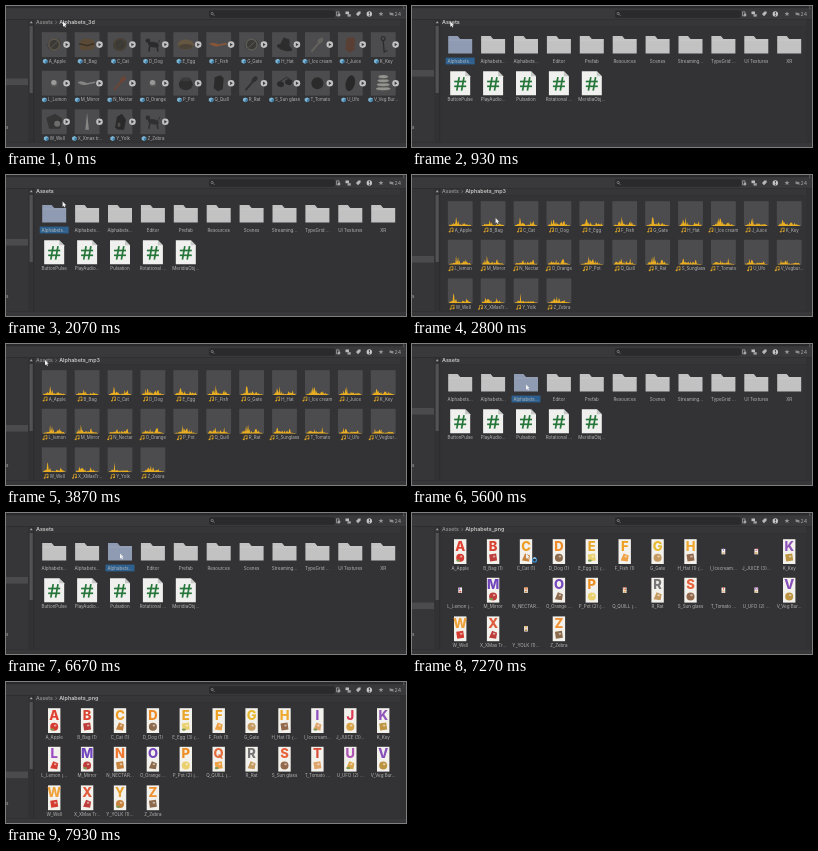
These frames come from a looping animation (400 px wide and 141 px high, 8000 ms). An HTML page with a canvas:

```html
<!DOCTYPE html>
<html lang="en">
<head>
<meta charset="utf-8">
<title>Asset browser</title>
<style>
html, body { margin: 0; width: 100%; height: 100%; overflow: hidden; background: #333; }
canvas { display: block; width: 400px; height: 141px; }
</style>
</head>
<body>
<canvas id="stage"></canvas>
<script>
const W = 400, H = 141, LOOP = 8000;
const canvas = document.getElementById('stage');
const ctx = canvas.getContext('2d');
const ratio = window.devicePixelRatio || 1;
canvas.width = W * ratio;
canvas.height = H * ratio;

const FONT = 'Inter, Roboto, sans-serif';
const LABEL = '#b4b4b5';
const list = s => s.split('|');
const folders = list('Alphabets...|Alphabets...|Alphabets...|Editor|Prefab|Resources|Scenes|Streaming...|TypeGrid ...|UI Textures|XR');
const scripts = list('ButtonPulse|PlayAudio...|Pulsation|Rotational ...|MeridiaObj...');
const models = list('A_Apple|B_Bag|C_Cat|D_Dog|E_Egg|F_Fish|G_Gate|H_Hat|I_Ice cream|J_Juice|K_Key|L_Lemon|M_Mirror|N_Nectar|O_Orange|P_Pot|Q_Quill|R_Rat|S_Sun glass|T_Tomato|U_Ufo|V_Veg Bur...|W_Well|X_Xmas tr...|Y_Yolk|Z_Zebra');
const sounds = list('A_Apple|B_Bag|C_Cat|D_Dog|E_Egg|F_Fish|G_Gate|H_Hat|I_Ice cream|J_Juice|K_Key|L_lemon|M_Mirror|N_Nectar|O_Orange|P_Pot|Q_Quill|R_Rat|S_Sunglass|T_Tomato|U_Ufo|V_Vegbur...|W_Well|X_XMasTr...|Y_Yolk|Z_Zebra');
const images = list('A_Apple|B_Bag (1)|C_Cat (1)|D_Dog (1)|E_Egg (3) (...|F_Fish (1)|G_Gate|H_Hat (1) (...|I_Icecream...|J_JUICE (3)...|K_Key|L_Lemon (...|M_Mirror|N_NECTAR...|O_Orange ...|P_Pot (2) (...|Q_QUILL (...|R_Rat|S_Sun glass|T_Tomato ...|U_UFO (2) ...|V_Veg Bur...|W_Well|X_XMas Tr...|Y_YOLK (1)...|Z_Zebra');

// Shape and tint of each model, A to Z
const modelShapes = list('ring|box|ring|animal|egg|bar|ring|hat|stick|cup|key|ball|bar|stick|ball|pot|cup|stick|glasses|disc|pod|stack|house|spike|rock|animal');
const modelTints = list('#5c574a|#5a4a35|#4a4034|#2b2b2b|#655641|#84563a|#5a5a57|#2d2d2e|#64625f|#5a4034|#2c2c2d|#9a9a98|#858482|#6b4638|#9a9896|#2e2e2f|#2b2b2c|#303031|#2a2a2b|#2b2b2b|#29292a|#93938f|#353536|#868684|#2a2a2b|#303031');
const inks = list('#e04132|#d94332|#ee9d24|#ed8b27|#e8a528|#efa022|#e7b82e|#eda82d|#8b4fc0|#dc3c55|#8f55b8|#9a4ac2|#7146bd|#ef7831|#7545ba|#ed8e23|#e26a3b|#777|#e8623c|#d94e38|#ad54b5|#8750b9|#f0a23a|#df5b3b|#e7a337|#ef9132');
const props = list('#d43c31|#bd3d3a|#c5833e|#8c6a4c|#ead06e|#eea144|#c59a61|#93694c|#dfa46c|#d8a348|#bc9442');

function rect(x, y, w, h, color) {
  ctx.fillStyle = color;
  ctx.fillRect(x, y, w, h);
}

function oval(x, y, rx, ry, color, turn = 0) {
  ctx.fillStyle = color;
  ctx.beginPath();
  ctx.ellipse(x, y, rx, ry, turn, 0, Math.PI * 2);
  ctx.fill();
}

function shape(points, color) {
  ctx.fillStyle = color;
  ctx.beginPath();
  for (let i = 0; i < points.length; i += 2) ctx.lineTo(points[i], points[i + 1]);
  ctx.closePath();
  ctx.fill();
}

function stroke(points, color, width) {
  ctx.strokeStyle = color;
  ctx.lineWidth = width;
  ctx.beginPath();
  for (let i = 0; i < points.length; i += 2) ctx.lineTo(points[i], points[i + 1]);
  ctx.stroke();
}

function ring(x, y, r, color, width, from = 0, to = 7) {
  ctx.strokeStyle = color;
  ctx.lineWidth = width;
  ctx.beginPath();
  ctx.arc(x, y, r, from, to);
  ctx.stroke();
}

function text(s, x, y, size, color, align = 'left', weight = 400) {
  ctx.font = `${weight} ${size}px ${FONT}`;
  ctx.textAlign = align;
  ctx.textBaseline = 'middle';
  ctx.fillStyle = color;
  ctx.fillText(s, x, y);
}

function random(seed) {
  const v = Math.sin(seed * 12.9898) * 43758.5453;
  return v - Math.floor(v);
}

function grid(names, draw) {
  names.forEach((name, i) => draw(name, 48.2 + (i % 11) * 32.9, 38.6 + Math.floor(i / 11) * 38.6, i));
}

function caption(s, x, y) {
  text(s, x, y, 4.5, LABEL, 'center');
}

// Icon and label, centred together below a thumbnail
function iconCaption(s, x, y, icon) {
  const size = 4.4, gap = 6;
  ctx.font = `400 ${size}px ${FONT}`;
  const left = x - (ctx.measureText(s).width + gap) / 2;
  icon(left + 2.5, y);
  text(s, left + gap, y, size, LABEL);
}

function cubeIcon(x, y) {
  shape([x - 2.3, y - 1.2, x, y - 2.4, x + 2.3, y - 1.2, x + 2.3, y + 1.3, x, y + 2.5, x - 2.3, y + 1.3], '#7db4d2');
  shape([x, y, x + 2.3, y - 1.2, x + 2.3, y + 1.3, x, y + 2.5], '#3c7ca6');
}

function noteIcon(x, y) {
  const gold = '#e0a82a';
  stroke([x - 1, y + 1.5, x - 1, y - 1.8, x + 1.9, y - 2.3, x + 1.9, y + 0.9], gold, 0.7);
  oval(x - 1.6, y + 1.6, 1, 0.8, gold);
  oval(x + 1.3, y + 1, 1, 0.8, gold);
}

function chrome(view) {
  rect(0, 0, W, H, '#333335');
  rect(0, 0, W, 2.4, '#2a2a2c');
  rect(0, 2.4, W, 10.6, '#39393b');
  rect(0, 13, W, 0.6, '#2a2a2c');
  rect(28, 13.6, 366, 6.6, '#363638');
  rect(28, 20.2, 366, 0.5, '#2f2f31');
  ctx.fillStyle = '#2a2a2c';
  ctx.beginPath();
  ctx.roundRect(203, 4.3, 126, 7.4, 2);
  ctx.fill();
  ring(206.2, 7.5, 1.1, '#a0a0a0', 0.6);
  stroke([207, 8.4, 208.3, 9.7], '#a0a0a0', 0.7);

  // Toolbar icons
  stroke([330.5, 5.8, 333, 5.8, 333, 9.8, 330.5, 9.8, 330.5, 5.8], '#a8a8a8', 0.7);
  oval(333, 9, 1.4, 1.4, '#a8a8a8');
  shape([339.5, 5.5, 343, 5.5, 343, 8.2, 339.5, 8.2], '#bcbcbc');
  shape([341.5, 8.2, 344.8, 8.2, 344.8, 10.6, 341.5, 10.6], '#a0a0a0');
  shape([350, 8, 352.4, 5.4, 354.6, 5.4, 354.6, 7.6, 352, 10.3], '#b8b8b8');
  oval(363.3, 7.9, 2.7, 2.7, '#c6c6c6');
  rect(362.9, 6, 0.9, 2.4, '#333');
  rect(362.9, 9, 0.9, 0.9, '#333');
  const star = [];
  for (let i = 0; i < 10; i++) {
    const r = i % 2 ? 1.1 : 2.6, a = i * Math.PI / 5 - Math.PI / 2;
    star.push(375 + r * Math.cos(a), 8 + r * Math.sin(a));
  }
  shape(star, '#949494');
  oval(385.5, 8, 2.2, 1.3, '#888');
  stroke([383.5, 6, 387.5, 10], '#999', 0.6);
  text('24', 388.6, 8.2, 5.2, '#a8a8a8');
  for (let i = 0; i < 3; i++) rect(397.5, 0.2 + i, 0.7, 0.6, '#aaa');

  // Folder tree and its scrollbar
  const rows = { root: 64, model: 72.5, sound: 81, image: 89.5 };
  rect(0, 14, 22, 122, '#363638');
  rect(0, rows[view], 22, 6.6, '#4b4b4d');
  text('s', 0, 121.5, 4.6, '#aaa');
  rect(22.3, 14, 5.2, 122, '#323234');
  shape([23.7, 17.3, 25.2, 15, 26.7, 17.3], '#a0a0a0');
  rect(23.6, 20, 3.2, 67, '#525254');
  rect(27.5, 13, 0.6, 123, '#29292b');
  rect(394.5, 13.6, 5.5, 122.4, '#313133');
  rect(0, 136, W, 0.6, '#2a2a2c');
  rect(0, 136.6, W, 4.4, '#37373a');
}

function breadcrumb(folder) {
  if (!folder) return text('Assets', 30, 16.4, 5.4, '#c8c8c8', 'left', 600);
  text('Assets', 30, 16.4, 5.3, '#a6a6a6');
  stroke([49.4, 15, 50.8, 16.4, 49.4, 17.8], '#999', 0.6);
  text(folder, 53.2, 16.4, 5.4, '#c6c6c6', 'left', 600);
}

function drawRoot(selected) {
  grid(folders, (name, x, y, i) => {
    const on = i === selected;
    const tone = on ? '#8f9bb2' : '#c2c2c3';
    shape([x - 12, y - 8.5, x - 2.5, y - 8.5, x, y - 5.6, x + 12, y - 5.6, x + 12, y + 9, x - 12, y + 9], tone);
    rect(x - 11.5, y - 4.8, 23, 0.5, on ? '#a3adc0' : '#d0d0d0');
    if (on) rect(x - 14.5, y + 13, 29, 6.8, '#2d608e');
    caption(name, x, y + 16.6);
  });
  scripts.forEach((name, i) => {
    const x = 48.2 + i * 32.9, y = 77.2;
    shape([x - 10, y - 12, x + 5, y - 12, x + 10, y - 7, x + 10, y + 12, x - 10, y + 12], '#f0f1ef');
    shape([x + 5, y - 12, x + 10, y - 7, x + 5, y - 7], '#c6c8c5');
    const green = '#26763a';
    for (const d of [-2.2, 2.6]) {
      stroke([x + d + 1.2, y - 6, x + d - 1.2, y + 7.5], green, 1.7);
      stroke([x - 6, y + d + 0.5, x + 6, y + d + 0.5], green, 1.7);
    }
    caption(name, x, 93.8);
  });
}

// Each is drawn around the origin
const drawModel = {
  ring(c) {
    oval(0, 0, 7, 6, '#3b3a37', -0.4);
    ring(0, 0, 5.5, c, 1.6);
    stroke([-3, 3, 3, -3], c, 1);
  },
  box(c) {
    shape([-8, -2, -3, -6, 6, -5, 8, 0, 6, 5, -6, 6], c);
    stroke([-8, -1, 0, 1, 7, -1], '#352f28', 1.4);
  },
  animal(c) {
    oval(0.5, 0, 5.5, 2.6, c, 0.2);
    oval(-5, -4, 2.3, 2.2, c);
    stroke([-5, -4, -3, 0, -4, 7], c, 1.6);
    stroke([4, 0, 5, 7], c, 1.6);
    stroke([5, -1, 7, -5], c, 0.8);
  },
  egg(c) {
    oval(0, 0, 8, 5, c);
    oval(0, 2, 7, 2.6, '#4c4338');
  },
  bar(c) {
    stroke([-9, -1, -2, 1, 8, -1], c, 1.6);
    oval(-4, 0, 4, 1.6, c, 0.2);
  },
  hat(c) {
    oval(0, 3, 8, 3, c, 0.3);
    shape([-5, 1, -1, -7, 5, -5, 5, 4], c);
  },
  stick(c) {
    stroke([-6, 7, 5, -6], c, 2);
    oval(3, -4, 3.4, 2.2, c, -0.8);
  },
  cup(c) {
    shape([-4, -6, 2, -8, 5, -5, 4, 6, -1, 8, -5, 5], c);
  },
  key(c) {
    ring(0, -6, 2, c, 1.2);
    stroke([0, -4, 1, 8], c, 1.3);
    stroke([1, 7, 4, 6], c, 1.2);
  },
  ball(c) {
    oval(0, 0, 3.4, 3.4, '#5e5e5d');
    oval(-0.4, -0.6, 2.6, 2.5, c);
  },
  pot(c) {
    oval(0, 1, 7, 6, c);
    oval(0, -4, 5, 2, '#3b3b3c');
  },
  glasses(c) {
    oval(-4, 1, 3.5, 2.8, c, 0.3);
    oval(4, -1, 3.5, 2.8, c, 0.3);
    stroke([-7, 0, 2, -6, 8, -2], c, 0.9);
  },
  disc(c) {
    oval(0, 0, 6, 6, c);
  },
  pod(c) {
    oval(0, 0, 4.6, 8, c, 0.25);
  },
  stack(c) {
    for (let j = 0; j < 4; j++) {
      oval(0, 6 - j * 4, 7.5 - j * 0.8, 2.3, '#555553');
      oval(0, 5.4 - j * 4, 7.2 - j * 0.8, 1.7, c);
    }
  },
  house(c) {
    shape([-8, -4, 1, -8, 8, -3, 6, 7, -5, 7], c);
    oval(3, 2, 3, 3, '#6d6d6b');
  },
  spike(c) {
    shape([-1.8, 8, 0, -9, 1.8, 8], c);
  },
  rock(c) {
    shape([-5, 6, -3, -5, 2, -8, 6, -2, 4, 8, -2, 8], c);
    oval(-1, 3, 1.5, 2.2, '#4c4946');
  }
};

function thumb(x, y) {
  rect(x - 12.4, y - 12.4, 24.8, 24.8, '#4c4c4e');
}

function drawModels() {
  grid(models, (name, x, y, i) => {
    thumb(x, y);
    ctx.save();
    ctx.translate(x, y);
    drawModel[modelShapes[i]](modelTints[i]);
    ctx.restore();
    oval(x + 12.4, y, 3.3, 3.3, '#c2c2c3');
    shape([x + 11.4, y - 1.7, x + 14.1, y, x + 11.4, y + 1.7], '#3a3a3c');
    iconCaption(name, x, y + 16.6, cubeIcon);
  });
}

function drawSounds() {
  grid(sounds, (name, x, y, i) => {
    thumb(x, y);
    const base = y + 12.3, steps = 32;
    const first = 0.2 + random(i + 5) * 0.15, second = 0.65 + random(i + 9) * 0.15;
    const wave = [x - 11, base];
    for (let j = 0; j <= steps; j++) {
      const u = j / steps;
      const envelope = Math.exp(-Math.pow((u - first) * 6, 2)) + 0.7 * Math.exp(-Math.pow((u - second) * 7, 2));
      const spike = Math.pow(random(i * 41 + j), 3);
      wave.push(x - 11 + u * 22, base - 0.5 - envelope * (1.2 + 8.5 * spike));
    }
    wave.push(x + 11, base);
    shape(wave, '#e9ad22');
    iconCaption(name, x, y + 16.6, noteIcon);
  });
}

function drawImages(t) {
  const late = 'IJLNQTUY';
  grid(images, (name, x, y, i) => {
    const order = late.indexOf(name[0]);
    const small = order >= 0 && t < 7400 + order * 60;
    ctx.save();
    ctx.translate(x, y);
    if (small) ctx.scale(0.3, 0.22);
    rect(-6.2, -12.4, 12.4, 24.8, '#f3f1ec');
    text(name[0], 0, -5, 13, inks[i], 'center', 800);
    const tone = props[i % props.length];
    if (i % 3 === 0) oval(0, 6.2, 4, 4, tone);
    else if (i % 3 === 1) shape([-4, 3, 3, 2, 4, 9, -3, 10], tone);
    else shape([-4, 9, -1, 2, 4, 4, 3, 10], tone);
    oval(1, 5, 1.3, 1, '#fff8');
    if (i % 4 === 0) oval(-2, 9, 2, 1.1, '#7d9a52');
    ctx.restore();
    caption(name, x, y + 16.8);
  });
}

// time, x, y
const path = [
  [0, 57, 15.5], [200, 56.5, 15.5], [780, 38.3, 15.5], [1740, 38.3, 15.5],
  [2500, 83.6, 43], [3000, 83.6, 43], [3720, 39, 16], [4330, 39, 16],
  [5130, 114, 40.5], [8000, 114, 40.5]
];

function pointerAt(t) {
  const k = Math.max(1, path.findIndex(p => p[0] > t));
  const a = path[k - 1], b = path[k];
  const u = (t - a[0]) / (b[0] - a[0]);
  const e = u * u * (3 - 2 * u);
  return [a[1] + (b[1] - a[1]) * e, a[2] + (b[2] - a[2]) * e];
}

function drawPointer(t) {
  if (t >= 7600) return;
  const [x, y] = pointerAt(t);
  shape([x, y, x, y + 5.3, x + 1.2, y + 4.2, x + 2.1, y + 5.9, x + 2.9, y + 5.5, x + 2.1, y + 3.8, x + 3.7, y + 3.7], '#f0f0f0');
  if (t >= 7060) {
    ring(x + 8.5, y + 6.5, 2, '#3a91d5', 1.2);
    ring(x + 8.5, y + 6.5, 2, '#a9d9f5', 1.2, t / 120, t / 120 + 1.4);
  }
}

function render(t) {
  ctx.setTransform(ratio, 0, 0, ratio, 0, 0);
  const view = t < 930 ? 'model' : t < 2730 ? 'root' : t < 4000 ? 'sound' : t < 7060 ? 'root' : 'image';
  chrome(view);
  breadcrumb({ model: 'Alphabets_3d', sound: 'Alphabets_mp3', image: 'Alphabets_png' }[view]);
  if (view === 'root') drawRoot(t < 2470 ? 0 : t < 5130 ? 1 : 2);
  else if (view === 'model') drawModels();
  else if (view === 'sound') drawSounds();
  else drawImages(t);
  drawPointer(t);
}

const start = performance.now();
function tick() {
  render((performance.now() - start) % LOOP);
  requestAnimationFrame(tick);
}
tick();
</script>
</body>
</html>
```
